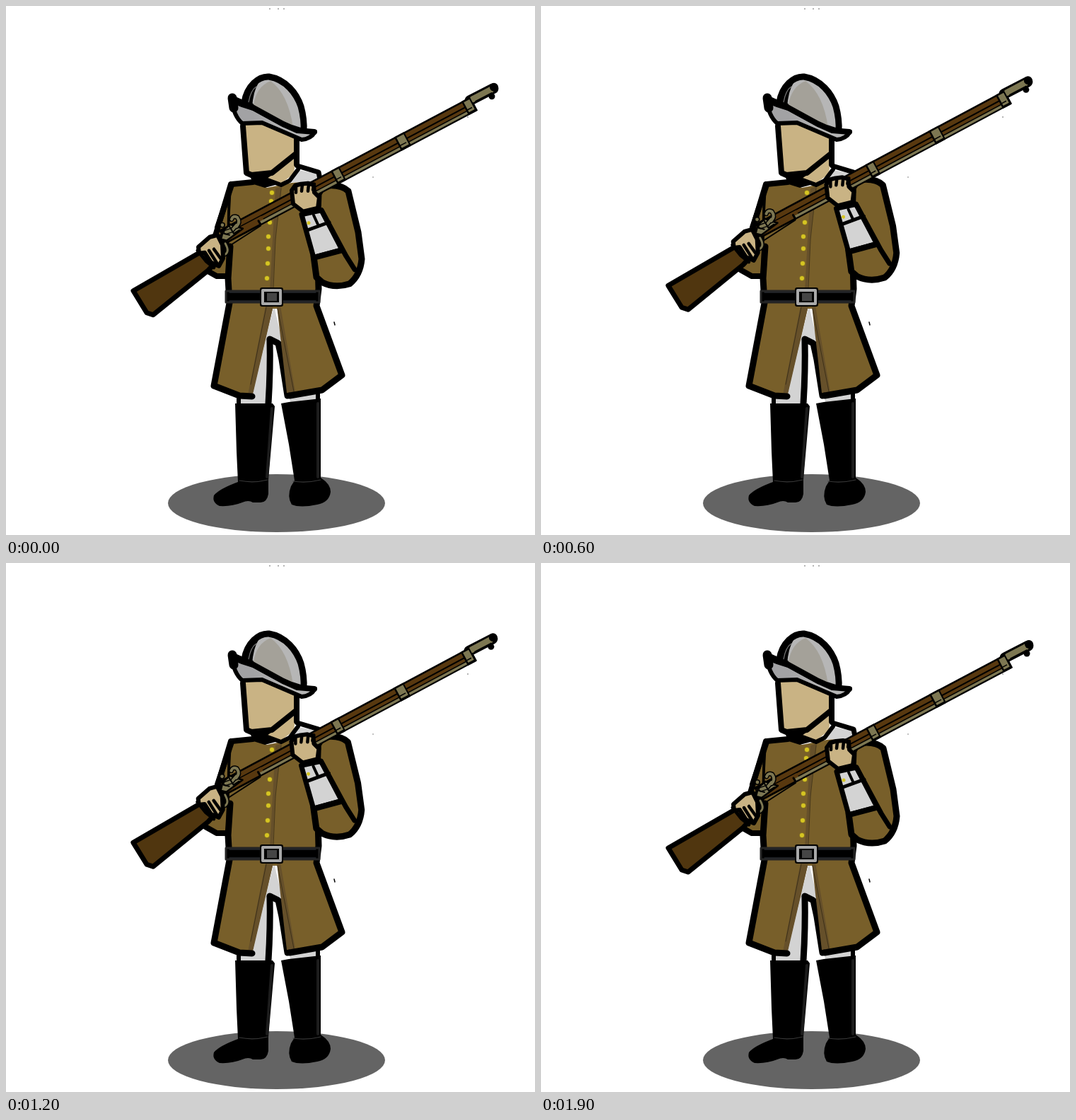
An HTML page with a canvas for the animation above (2 s loop, 748 by 748 pixels).

```html
<!DOCTYPE html>
<html lang="en">
<head>
<meta charset="utf-8">
<title>Musketeer idle</title>
<style>
  html, body { margin: 0; width: 100%; height: 100%; overflow: hidden; background: #fff; }
  canvas { display: block; width: 748px; height: 748px; }
</style>
</head>
<body>
<canvas id="stage" width="748" height="748"></canvas>
<script>
const ctx = document.getElementById('stage').getContext('2d');
const LOOP = 2000, STEP = 100;
const INK = '#000', COAT = '#785f2a', FOLD = '#66502a', WOOD = '#50360f', BARREL = '#58380f';
const SKIN = '#c9b384', LINEN = '#d3d3d3', STEEL = '#b6b6b6', BRASS = '#7d7752', GOLD = '#d6c522';

const brimShade = ctx.createLinearGradient(350, 0, 400, 0);
brimShade.addColorStop(0, '#a2a2a4');
brimShade.addColorStop(1, STEEL);

ctx.lineJoin = ctx.lineCap = 'round';

function shape(d, fill, width = 0, ink = INK) {
  const path = new Path2D(d);
  if (fill) { ctx.fillStyle = fill; ctx.fill(path); }
  if (width) { ctx.lineWidth = width; ctx.strokeStyle = ink; ctx.stroke(path); }
}

function line(d, width, ink = INK) { shape(d, null, width, ink); }

function dot(x, y, rx, fill, ry = rx) {
  ctx.beginPath();
  ctx.ellipse(x, y, rx, ry, 0, 0, Math.PI * 2);
  ctx.fillStyle = fill;
  ctx.fill();
}

function specks() {
  for (const x of [373, 385, 393]) dot(x, 4, 0.8, '#555');
  line('M464 447L465 451', 1.5);
  dot(519, 242, 0.7, '#555');
  dot(653, 157, 0.8, '#555');
}

function legs() {
  dot(382.5, 703, 153.5, '#646464', 41);
  shape('M379 424L390 472L374 474L368 564H331V545L350 535Z', LINEN);
  shape('M400 545L439 540V558L402 561Z', LINEN);
  line('M329 546V563', 6);
  line('M373 472Q374 515 371 562', 9);
  line('M373 471L385 477L390 500L398 551', 9);
  line('M441 546V560', 6);

  shape('M324 562H377L380 566L371 670L371 690Q369 702 360 702H349Q343 698 334 702Q319 708 302 707'
    + 'Q291 702 294 692Q301 683 328 673L326 630Z', INK);
  shape('M389 562L400 560L445 555V667Q459 676 459 687Q457 702 440 705Q416 710 404 705'
    + 'Q397 694 403 679L408 671L400 620Z', INK);
  line('M376 569L369 666', 4, '#1c1c1c');
  line('M441 562V666', 4, '#1c1c1c');
  line('M330 671Q350 675 370 670M406 672Q425 675 445 670', 1.2, '#383838');
}

function coat() {
  shape('M318 252L296 325L278 347L282 373L298 382H315Z', COAT, 8);
  shape('M319 253L349 249L369 257L404 250L442 246L443 400L441 424L475 522L447 543L407 549'
    + 'L384 428H377L348 550L330 549L293 537L316 420L314 385L317 290Z', COAT);
  shape('M381 258L390 255L382 320L377 402H373Z', FOLD);
  line('M389 258L381 330L378 401', 1, '#493a1c');
  shape('M367 424H378L349 549L342 550Z', FOLD);
  shape('M383 424H388L409 546L397 547Z', FOLD);
  line('M368 426L346 535M384 428L407 545', 1, '#3d3018');
  line('M317 340L314 385L316 420L294 537L330 551L348 552', 9);
  line('M401 551L447 543L475 522L439 424L442 400L441 365', 9);
  line('M319 252L349 249', 8);
  line('M319 253L299 313', 8);
  for (const [x, y] of [[376, 264], [375, 276], [374, 290], [373, 306], [371, 326], [371, 343], [370, 364], [369, 385]]) {
    dot(x, y, 3.7, '#8d7b20');
    dot(x, y, 3, GOLD);
  }

  shape('M311 403H443V419H311Z', INK, 3, '#242424');
  line('M316 405H438M316 417H438', 1, '#353940');
  shape('M362 401H389V422H362Z', INK, 6);
  shape('M363 402H388V421H363Z', INK, 4, '#a9a9a9');
  shape('M369 406H383V417H369Z', '#454545');
}

function head() {
  shape('M346 243L372 236L385 252L366 257L350 252Z', INK);
  shape('M369 244L410 214L407 237L389 251Z', SKIN);
  shape('M401 249L414 232L439 237L443 245L425 250Z', LINEN);
  line('M370 246L389 253L401 247L413 231', 6);
  line('M412 226L442 235L444 245', 7);
  shape('M334 166L340 236L376 235L411 207L411 182L362 160Z', SKIN);
  line('M335 170L340 236L347 239L376 236L411 208V188', 8);
  line('M411 190V224', 8);

  shape('M337 136C341 113 357 99 372 100C396 104 411 124 417 142Q422 160 421 178L390 168Z', STEEL, 9);
  shape('M350 140Q354 114 374 106Q399 124 406 172L390 166Z', '#a4a199');
  shape('M336 140Q339 118 358 107Q349 121 348 144Z', INK);
  line('M343 136Q346 119 354 114', 1.2, '#777');
  shape('M319 132Q326 139 350 145L392 168L412 176L437 178Q431 188 418 189L390 177L362 165'
    + 'L334 166Q322 156 319 132Z', brimShade, 6);
  line('M321 131L350 144L392 167L412 176L436 178', 8);
  line('M320 130L322 144', 13);
}

// A strip that runs parallel to the gun's axis, shifted down by dy.
function strip(x1, x2, dy, width, ink) {
  const y = x => 240 - (x - 470) * 0.53 + dy;
  ctx.lineCap = 'butt';
  line(`M${x1} ${y(x1)}L${x2} ${y(x2)}`, width, ink);
  ctx.lineCap = 'round';
}

function gun() {
  shape('M272 350L180 403L199 434L208 437L286 374L312 346L306 325Z', WOOD, 7);
  strip(306, 662, 0, 22, INK);
  strip(308, 362, 1, 15, BARREL);
  strip(330, 655, -5.5, 7, BARREL);
  strip(362, 655, 2, 4, BARREL);
  strip(358, 660, 8, 3.5, BRASS);
  strip(330, 650, -1.6, 1.5, INK);
  line('M312 342L360 311', 2);
  line('M357 304L360 309', 3);

  line('M656 134L689 117', 15);
  line('M660 132L686 118.5', 9, BRASS);
  line('M664 135L687 123', 1.5);
  dot(690, 115, 6, INK);
  dot(687, 128, 4.5, INK);
  for (const [x, dx] of [[470, 4], [561, 5], [655, 4]]) {
    strip(x - dx - 2, x + dx + 2, 0, 22, INK);
    strip(x - dx, x + dx, -0.5, 16, BRASS);
    strip(x - dx, x + dx, 4, 1.5, INK);
  }

  shape('M304 330L307 318L317 309L328 313L335 315L312 332Z', BRASS, 2.5);
  const cock = 'M311 320L320 317L326 310M319 302Q321 296 327 299Q332 306 326 312';
  line(cock, 7);
  line(cock, 4, BRASS);
  line('M308 322L316 324M316 312L322 322L330 317', 2);
  dot(306, 310, 4, INK);
  dot(306, 310, 2.4, BRASS);
  line('M310 336Q317 348 309 352', 6);
  line('M310 336Q317 348 309 352', 3, BRASS);
}

function rearHand() {
  shape('M272 341L288 327L299 324L306 338L307 357L301 368L290 363L281 349L273 350Z', SKIN, 6);
  line('M281 350L291 366M287 346L299 365M294 344L304 358', 4.5);
  line('M271 346L283 361L294 370', 5);
}

function sleeve() {
  shape('M442 266Q447 254 460 254Q476 254 484 262L498 320L503 358Q501 381 486 393'
    + 'Q465 400 447 391L439 384L435 354L472 343L441 292Z', COAT, 9);
}

function frontArm() {
  shape('M418 295L446 289L475 345L435 356Z', LINEN, 7);
  line('M424 318L457 306', 5);
  line('M435 296L441 309', 4);
  line('M446 289L481 354L493 373', 7);
  line('M436 356L474 346', 8);
  dot(428, 307, 2.5, GOLD);
  shape('M404 261L409 254L417 252L427 251L435 253L436 264L443 271L441 286L420 291L406 280Z', SKIN, 6);
  line('M410 264L410 254M418 262L419 253M427 262L428 252M434 260L436 252', 4.5);
}

function draw(now) {
  const t = Math.floor((now % LOOP) / STEP) * STEP;
  const lift = 4.9 * (1 - Math.cos(2 * Math.PI * (t + 100) / LOOP));
  ctx.clearRect(0, 0, 748, 748);
  specks();
  legs();
  coat();
  head();

  ctx.save();
  ctx.translate(200, 430 - lift);
  ctx.rotate(-lift * 0.0005);
  ctx.translate(-200, -430);
  sleeve();
  gun();
  rearHand();
  frontArm();
  ctx.restore();
}

const start = performance.now();
function tick() {
  draw(performance.now() - start);
  requestAnimationFrame(tick);
}
tick();
</script>
</body>
</html>
```
